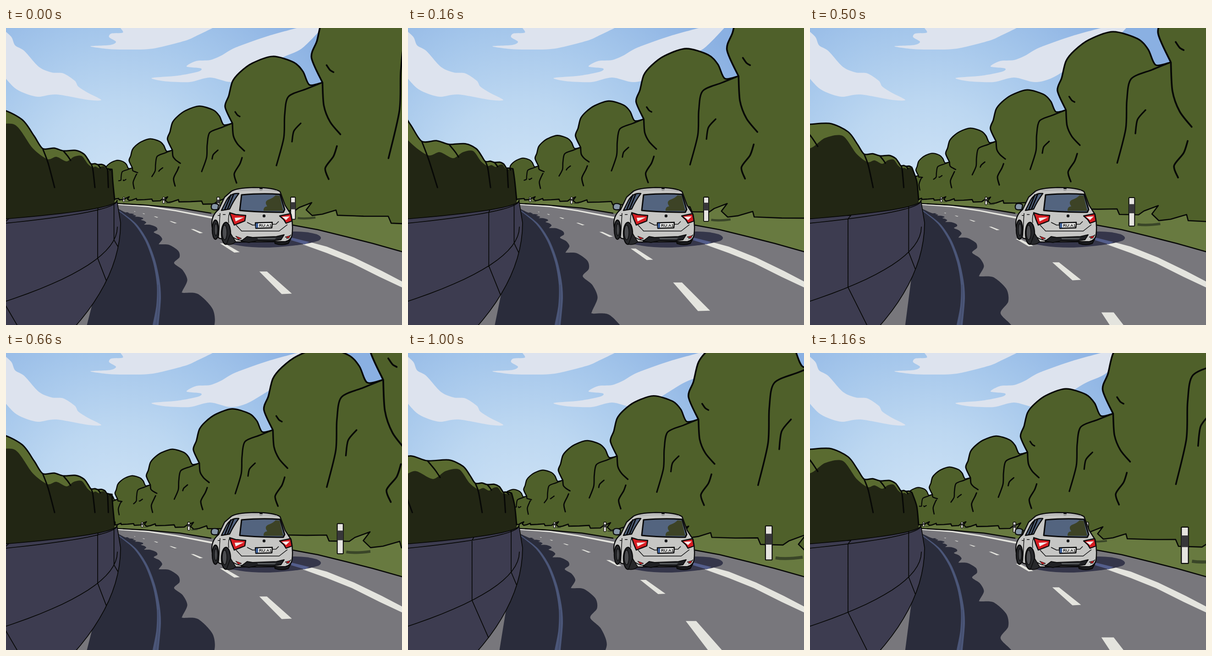
An HTML page that plays this animation: 864 px wide and 648 px high, repeating every 1.33 s.

```html
<!DOCTYPE html>
<html lang="en">
<head>
<meta charset="utf-8">
<title>Country road drive</title>
<style>
html, body { margin: 0; width: 100%; height: 100%; overflow: hidden; background: #78777c; }
svg { display: block; }
.ink { fill: none; stroke: #070806; stroke-linecap: round; stroke-linejoin: round; }
.car { stroke: #0b0b0c; stroke-width: 2.4; stroke-linejoin: round; }
</style>
</head>
<body>
<svg width="864" height="648" viewBox="0 0 864 648">
  <defs>
    <radialGradient id="sky" gradientUnits="userSpaceOnUse" cx="250" cy="350" r="540">
      <stop offset="0" stop-color="#cfe3f6"/><stop offset=".35" stop-color="#bcd7f1"/>
      <stop offset=".65" stop-color="#a4c6eb"/><stop offset="1" stop-color="#8ab0e2"/>
    </radialGradient>
  </defs>
  <rect width="864" height="648" fill="url(#sky)"/>
  <g id="clouds" fill="#dde3ee"></g>
  <g id="trees"></g>
  <path fill="#78777c" d="M236 383 300 386 380 393 447 404 627 430 680 440 745 456 800 470 864 488V648H140Z"/>
  <path id="grass" fill="#687a40"/>
  <path id="hedge" class="ink" stroke-width="2.6"/>
  <path class="ink" stroke-width="2.6" d="M243 383 300 386 380 393 447 404M620 429 680 440 745 456 800 470 864 488"/>
  <g id="posts"></g>
  <path fill="#e4e4de" d="M243 384 310 388 370 397 450 412V416L370 400 310 391 243 386ZM622 456 700 477 760 501 820 530 864 553V566L815 543 755 513 700 491 622 463Z"/>
  <path id="dashes" fill="#e4e4de"/>
  <path id="shade" fill="#2a2c3b"/>
  <path id="edgeLine" fill="#4b5678"/>
  <path fill="none" stroke="#3c4563" d="M332 560Q335 605 327 648"/>
  <path id="leafLight" fill="#5a6b30"/>
  <path id="leafDark" fill="#222614"/>
  <path id="leafInk" class="ink" stroke-width="3"/>
  <path id="wall" fill="#3d3c50"/>
  <path id="wallInk" class="ink" stroke-width="1.7"/>

  <g id="car">
    <path fill="#35364a" d="M476 468Q520 480 575 479Q650 475 682 464Q694 457 678 450Q655 443 624 444Z"/>
    <path fill="#545e8c" d="M622 457 662 467 652 472 622 463Z"/>
    <g class="car">
      <path fill="#1c1d20" d="M585 460H621L616 470Q602 475 587 470Z"/>
      <path fill="#c6c6c4" d="M492 356Q504 349 540 348Q585 348 598 357L609 387 622 407Q627 430 624 452Q622 463 610 466L500 467 466 459Q449 450 449 425Q450 407 464 396L477 369Z"/>
      <path fill="#53647f" d="M503 361Q490 361 481 376L470 398 488 395Q495 379 508 361Z"/>
      <path fill="none" d="M491 363 477 397M497 362 483 396" stroke-width="3"/>
      <path fill="#53647f" stroke-width="3" d="M514 364Q560 360 598 363L608 396 605 402Q550 402 510 398Z"/>
      <path fill="#3d4326" stroke="none" d="M562 399Q561 390 570 389Q562 378 574 374Q584 370 588 365L597 366 605 399Z"/>
      <path fill="#8797a8" d="M450 384Q458 381 464 386L462 396Q454 398 449 395Q446 389 450 384Z"/>
      <path fill="#111" d="M554 349H559V354H554Z" stroke-width="1.5"/>
      <ellipse cx="457" cy="440" rx="7" ry="21" fill="#27282b"/>
      <ellipse cx="458" cy="440" rx="3.5" ry="13" fill="#47484b" stroke-width="1.3"/>
      <ellipse cx="480" cy="448" rx="10" ry="24" fill="#27282b"/>
      <ellipse cx="477" cy="446" rx="5" ry="16" fill="#4c4d50" stroke-width="1.4"/>
      <path fill="#27282b" d="M481 472Q495 474 501 466L490 448Z" stroke-width="1.5"/>
      <path fill="#d71d22" d="M488 403 501 407 523 409 521 421 498 430 493 418Z"/>
      <path fill="#f4eded" stroke="none" d="M499 414 519 413 501 422Z"/>
      <path fill="#d71d22" d="M597 410 621 405 624 421 611 426 606 418Z"/>
      <path fill="#f4eded" stroke="none" d="M602 412 619 411 611 419Z"/>
      <path fill="none" stroke-width="1.5" d="M467 404 464 458M488 403Q484 412 486 425M462 409H467M473 407H479M502 430 514 443 596 443 614 429M526 424 538 430 589 428 595 422M496 457Q507 464 516 463M612 460 622 451"/>
      <path fill="#202124" stroke-width="1.8" d="M513 465 526 455 538 457 590 455 607 451 600 462 580 465 548 464 530 468Z"/>
      <path fill="#55585a" stroke="none" d="M548 458H590L586 461H550Z"/>
      <path fill="#d71d22" stroke-width="1" d="M501 454 514 459 507 461ZM609 456 620 453 617 459Z"/>
      <path fill="#f0f0ee" d="M544 425 581 424 580 436 545 437Z"/>
      <path fill="#3c5f98" stroke="none" d="M545 426H550V436H545Z"/>
      <circle cx="563" cy="410" r="3.2" fill="#17181a" stroke="none"/>
    </g>
    <path fill="none" stroke="#b3b3b4" stroke-width="3" d="M505 355Q550 350 591 356"/>
    <text x="552" y="434" font-family="Liberation Sans, sans-serif" font-weight="bold" font-size="9" fill="#0c0c0d">RU:A1</text>
  </g>
</svg>
<script>
const $ = id => document.getElementById(id);
const put = (id, d) => $(id).setAttribute('d', d);
const nums = s => s.split(' ').map(Number);

// Smooth path through flat x,y points
function curve(p) {
  const n = p.length / 2;
  const at = i => { i = Math.max(0, Math.min(n - 1, i)); return [p[2 * i], p[2 * i + 1]]; };
  let d = 'M' + at(0);
  for (let i = 0; i < n - 1; i++) {
    const [a, b, c, e] = [at(i - 1), at(i), at(i + 1), at(i + 2)];
    const q = [0, 1].map(j => b[j] + (c[j] - a[j]) / 7);
    const r = [0, 1].map(j => c[j] - (e[j] - b[j]) / 7);
    d += 'C' + [...q, ...r, ...c].map(v => v.toFixed(1)).join(' ');
  }
  return d;
}
const line = p => 'M' + p.map(v => v.toFixed(1)).join(' ');
const zoom = (p, cx, cy, s) => p.map((v, i) => i % 2 ? cy + (v - cy) * s : cx + (v - cx) * s);

$('clouds').innerHTML = [
  '-5 4 12 20 20 38 40 50 72 85 100 97 125 99 150 115 158 128 180 142 208 157 180 157 110 145 70 150 40 142 18 130 -5 105',
  '455 -2 420 15 390 28 320 45 265 47 225 46 184 40 228 37 240 30 225 20 230 12 255 10 248 -2',
  '642 -2 570 18 500 43 470 60 445 70 415 72 394 84 425 88 420 95 375 104 318 109 345 116 400 118 445 108 490 118 530 108 600 66 645 45 692 -2'
].map(s => `<path d="${curve(nums(s))}Z"/>`).join('');
put('edgeLine', curve(nums('244 396 283 426 308 462 325 505 335 550 338 590 333 648')) +
  curve(nums('320 648 328 605 329 560 321 512 304 465 279 427 244 398')).replace('M', 'L') + 'Z');

// Right-hand trees: one tree, repeated and growing away from a vanishing point
const GROW = 1.5, VX = 101, VY = 379;
const crown = nums('494 208 478 172 486 148 494 117 510 97 537 77 582 62 628 75 648 95 662 124 690 119');
const strokes = [
  '690 119 655 133 616 150 608 190 606 240 590 300',
  '494 208 496 235 505 253 520 268',
  '515 283 510 297 498 318 503 338',
  '643 208 628 225 624 248'
].map(nums);
const nick = nums('500 183 505 190 510 193');

function place(p, u) {
  return p.map((v, i) => {
    if (i % 2 == 0) return VX + (v - VX) * GROW ** (u - 3);
    // low strokes rise more slowly than the crown
    const h = VY - v, rate = 1.2 + .32 * Math.max(0, Math.min(1, (h - 80) / 80));
    return VY - h * rate ** (u - 3);
  });
}
function tree(u) {
  const c = place(crown, u);
  const ink = [crown, ...strokes, ...(u > 2.8 ? [nick] : [])];
  return `<path fill="#4f602a" d="${curve(c)}h8V430H${c[0]}Z"/>` +
    `<path class="ink" stroke-width="${2.2 + Math.max(0, u) * .35}" d="${ink.map(p => curve(place(p, u))).join('')}"/>`;
}

// Hedge foot: x and offset from the ground curve
const foot = nums('594 6 630 3 640 -5 667 -18 655 -1 668 10 690 5 720 -7 723 4 780 0 834 -6');
const footY = x => 373 + 47 * (Math.max(0, x - 230) / 632) ** 1.6;
function drawHedge(k) {
  const p = [232, 374];
  for (let n = -4; n < 3; n++) {
    const s = GROW ** (n + k / 8);
    for (let i = 0; i < foot.length; i += 2) {
      const x = VX + (foot[i] - VX) * s;
      if (x > 236 && x < 1100) p.push(x, footY(x) + foot[i + 1] * Math.min(1.4, s));
    }
  }
  put('hedge', line(p));
  put('grass', line(p) + 'L1100 540 864 488 800 470 745 456 680 440 627 430 447 404 380 393 300 386 236 383Z');
}

function post(v) {
  const x = 22 + 235 * 1.37 ** v;
  if (x < 244) return '';
  const y = 379 + 39 * (Math.max(0, x - 230) / 400) ** 1.87;
  const top = 369 + Math.max(0, x - 690) * .085, h = y - top, w = 2 + h * .17;
  const l = x - w / 2;
  return `<path stroke="#3a4628" stroke-width="${h * .08 + .6}" fill="none" d="M${x + w} ${y - h * .06}q${h * .3} ${h * .05} ${h * .8} ${-h * .02}"/>` +
    `<rect x="${l}" y="${top}" width="${w}" height="${h}" rx="1.5" fill="#e6e4e0" stroke="#0a0a09" stroke-width="${1 + h * .016}"/>` +
    `<rect x="${l}" y="${top + h * .23}" width="${w}" height="${h * .32}" fill="#38373a"/>`;
}

// Centre line
function onMid(v) {
  const d = 331 * 1.37 ** (v - 6);
  return [230 + d, 388 + .23 * d + 1.85e-6 * d ** 3];
}
function dash(v) {
  const [x, y] = onMid(v), [X, Y] = onMid(v + .1 + .06 * v);
  const half = y => Math.max(.8, (y - 385) * .057);
  return line([x - half(y), y, x + half(y), y, X + half(Y), Y, X - half(Y), Y + .8]) + 'Z';
}

// Shadow edge: scallops along a square-root curve, as depth and overhang
const scallop = nums('72 0 73 .22 86 .33 100 .26 113 .08 128 .17 150 .16 174 0');
function drawShade(q) {
  const p = [244, 394];
  for (let n = -4; n < 2; n++) {
    for (let i = 0; i < scallop.length; i += 2) {
      const t = scallop[i] * 2.47 ** (n + q / 4);
      p.push(245 + 10.6 * Math.sqrt(t) * (1 + scallop[i + 1]), 400 + t);
    }
  }
  put('shade', curve(p) + 'H130L240 400Z');
}

// Left-hand trees: each is three times the one behind it
const bush = nums('80 263 105 262 125 268 152 267 170 275 179 287');
const gloom = nums('90 286 110 281 132 291 148 281 165 279 178 296');
function drawBushes(q) {
  const light = [], dark = [];
  let ink = '';
  for (let n = 1; n > -3; n--) {
    const z = p => zoom(p, 238, 313, 3 ** (n + q / 4));
    light.push(...z(bush));
    dark.push(...z(gloom));
    const trunk = z([80, 263, 92, 295, 106, 348]);
    trunk[5] = 348;
    ink += curve(trunk) + curve(z([125, 268, 135, 280, 141, 289]));
  }
  light.push(233, 335, 237, 375);
  dark.push(232, 335, 237, 375);
  put('leafLight', curve(light) + 'V430H-700Z');
  put('leafDark', curve(dark) + 'V430H-700Z');
  put('leafInk', curve(light) + ink);
}

// Wall edges by distance d from the far end
const rim = d => [242 - d, 376 + 2.6 * Math.sqrt(d)];
const lip = d => [243 - d, 376 + 3.2 * Math.sqrt(d)];
const bend = d => [243 - d, 434 + 10.4 * Math.sqrt(d)];
const base = d => [250 - .72 * d, 425 + 19.3 * Math.sqrt(d)];
function drawWall(q) {
  const ds = [...Array(18)].map((_, i) => i * i);
  const run = edge => ds.flatMap(edge);
  put('wall', line(run(rim)) + 'L-60 648 ' + run(base).reverse().reduce((s, v, i, a) => i % 2 ? s + `${v} ${a[i - 1]} ` : s, '') + 'Z');
  let ink = [rim, lip, bend, base].map(e => line(run(e))).join('') + 'M242 376 250 425';
  for (let j = 0; j < 9; j++) {
    const d = 43 * 1.55 ** (q + 4 - 4 * j);
    if (d > 5) ink += line([...rim(d * .95), ...lip(d), ...bend(d), ...base(d)]);
  }
  put('wallInk', ink);
}

function draw(k) {
  const u = k / 8, q = k % 4;
  let trees = '', posts = '', dashes = '';
  for (let n = -1; n < 5; n++) trees += tree(n + u);
  for (let n = -1; n < 4; n++) posts += post(n + u);
  for (let n = 0; n < 7; n++) dashes += dash(n + q / 4);
  $('trees').innerHTML = trees;
  $('posts').innerHTML = posts;
  put('dashes', dashes);
  drawHedge(k);
  drawShade(q);
  drawBushes(q);
  drawWall(q);
}

const LOOP = 1330, STEPS = 8;
const start = performance.now();
let shown = -1;
function tick() {
  const ms = (performance.now() - start) % LOOP;
  // steps fall on whole hundredths of a second
  let k = 0;
  while (k + 1 < STEPS && Math.floor((k + 1) * LOOP / STEPS / 10) * 10 <= ms) k++;
  if (k !== shown) draw(shown = k);
  requestAnimationFrame(tick);
}
tick();
</script>
</body>
</html>
```
